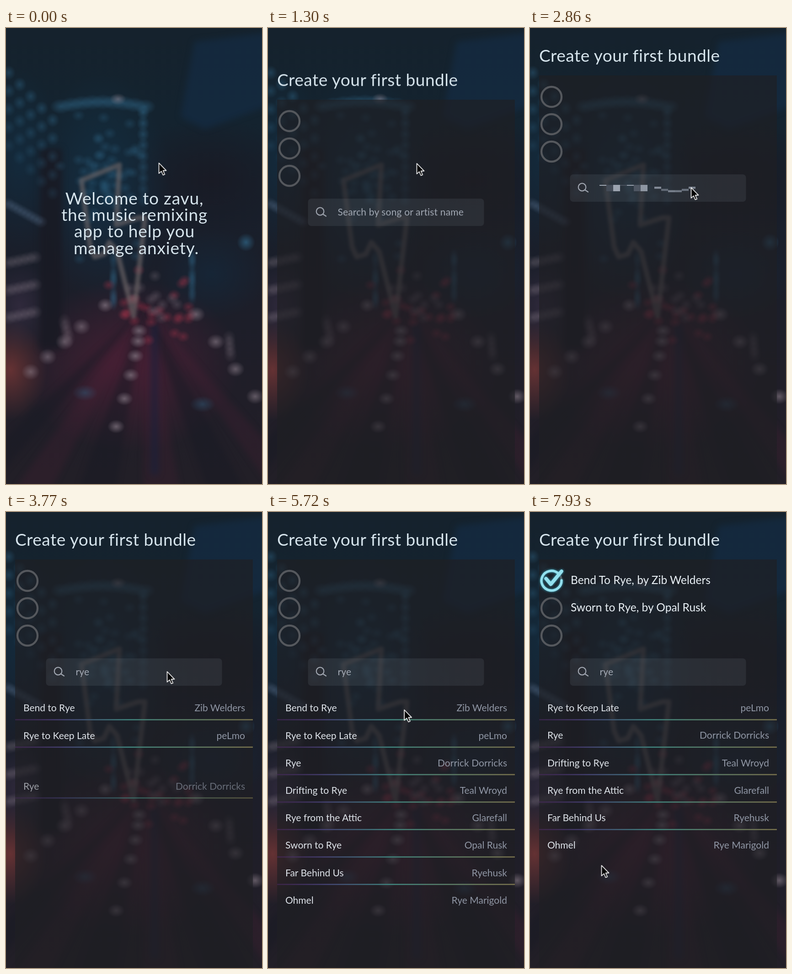
An HTML page with a canvas that plays this animation: 560x1000 px, repeating every 8000 ms.

```html
<!DOCTYPE html>
<html lang="en">
<head>
<meta charset="utf-8">
<title>Create your first bundle</title>
<style>
html, body { margin: 0; width: 100%; height: 100%; overflow: hidden; background: #1b1f28; }
canvas, svg { position: absolute; left: 0; top: 0; width: 560px; height: 1000px; }
text { font-family: Lato, "Open Sans", sans-serif; white-space: pre; }
.big { font-size: 37px; letter-spacing: .5px; fill: #d6e4ec; }
.mid { text-anchor: middle; letter-spacing: .85px; }
.query { font-size: 21px; letter-spacing: .15px; fill: #a4abb6; }
.song { font-size: 21px; fill: #dfe4ea; }
.artist { font-size: 21px; fill: #9097a5; text-anchor: end; }
.item { font-size: 24.5px; fill: #e9f0f5; }
.ring { fill: none; stroke: #55585d; stroke-width: 4.4; }

#welcome, #app, #cursor, #hint, #smear, .item, #check, .key {
  animation: 8s linear infinite paused;
}
#welcome { animation-name: leave; }
#app { animation-name: enter, rise; }
#cursor { animation-name: point; animation-timing-function: ease-in-out; }
#hint { animation-name: hint; animation-timing-function: step-end; }
#smear { animation-name: smear; animation-timing-function: step-end; }
.key { animation-timing-function: step-end; }
.key:nth-child(1) { animation-name: key1; }
.key:nth-child(2) { animation-name: key2; }
.key:nth-child(3) { animation-name: key3; }
#item1 { animation-name: add1; }
#item2 { animation-name: add2; }
#check { animation-name: check; }

@keyframes leave { 0%, .5% { opacity: 1 } 4.875%, 100% { opacity: 0 } }
@keyframes enter { 0%, 3.25% { opacity: 0 } 9.75%, 100% { opacity: 1 } }
@keyframes rise {
  0%, 12.1875% { transform: translateY(389px); animation-timing-function: cubic-bezier(.65, 0, .35, 1) }
  18.1875%, 100% { transform: translateY(0) }
}
@keyframes point {
  0%, 13% { transform: translate(334.5px, 296px) }
  16.25% { transform: translate(325.5px, 297px) }
  22.75%, 60.125% { transform: translate(352.5px, 350px) }
  68.25%, 69.875% { transform: translate(300px, 432px) }
  74.75%, 76.375% { transform: translate(292px, 440px) }
  82.875%, 87.75% { transform: translate(280px, 695px) }
  97.5%, 100% { transform: translate(156.5px, 775px) }
}
@keyframes hint { 0% { opacity: 1 } 35.7%, 100% { opacity: 0 } }
@keyframes smear { 0% { opacity: 0 } 35.7% { opacity: 1 } 37.3%, 100% { opacity: 0 } }
@keyframes key1 { 0% { fill-opacity: 0 } 37.3%, 100% { fill-opacity: 1 } }
@keyframes key2 { 0% { fill-opacity: 0 } 38.9%, 100% { fill-opacity: 1 } }
@keyframes key3 { 0% { fill-opacity: 0 } 40.6%, 100% { fill-opacity: 1 } }
@keyframes add1 { 0%, 77% { opacity: 0 } 81.25%, 100% { opacity: 1 } }
@keyframes add2 { 0%, 87.75% { opacity: 0 } 91%, 100% { opacity: 1 } }
@keyframes check { 0%, 91% { opacity: 0 } 95.875%, 100% { opacity: 1 } }
</style>
</head>
<body>
<canvas id="city" width="560" height="1000"></canvas>
<svg viewBox="0 0 560 1000">
  <defs>
    <linearGradient id="rule" gradientUnits="userSpaceOnUse" x1="20" y1="0" x2="540" y2="0">
      <stop offset="0" stop-color="#4d2a63" stop-opacity=".55"/>
      <stop offset=".2" stop-color="#43406f"/>
      <stop offset=".48" stop-color="#3f837c"/>
      <stop offset="1" stop-color="#77704c"/>
    </linearGradient>
    <filter id="glow" x="-40%" y="-40%" width="180%" height="180%"><feGaussianBlur stdDeviation="2.6"/></filter>
    <g id="tick" fill="none" stroke-linecap="round" stroke-linejoin="round">
      <path d="M61 134A22 21.500 0 1 0 69 150" stroke-width="5.400"/>
      <path d="M35 146L45.500 158.500L69 130" stroke-width="7.500"/>
    </g>
  </defs>

  <g id="welcome" class="big">
    <text class="mid" x="281" y="387">Welcome to zavu,</text>
    <text class="mid" x="281" y="423">the music remixing</text>
    <text class="mid" x="281" y="459">app to help you</text>
    <text class="mid" x="285" y="495.500">manage anxiety.</text>
  </g>

  <g id="app">
    <text class="big" x="20" y="74">Create your first bundle</text>
    <rect x="20" y="104" width="520" height="1300" fill="#1f2024" fill-opacity=".68"/>
    <circle class="ring" cx="47" cy="151" r="22"/>
    <circle class="ring" cx="47" cy="211" r="22"/>
    <circle class="ring" cx="47" cy="271" r="22"/>
    <g id="check">
      <use href="#tick" stroke="#3aa9c2" filter="url(#glow)"/>
      <use href="#tick" stroke="#93e0ee"/>
    </g>
    <text class="item" id="item1" x="89" y="158">Bend To Rye, by Zib Welders</text>
    <text class="item" id="item2" x="89" y="218">Sworn to Rye, by Opal Rusk</text>

    <rect x="87.500" y="321" width="385" height="60" rx="7" fill="#8a9aa3" fill-opacity=".13"/>
    <g fill="none" stroke="#a0a6b0" stroke-width="2.200" stroke-linecap="round">
      <circle cx="114" cy="349" r="8.300"/>
      <path d="M120 355L127 359.500"/>
    </g>
    <text class="query" id="hint" x="152.500" y="358">Search by song or artist name</text>
    <g id="smear"></g>
    <text class="query" x="152.500" y="358"><tspan class="key">r</tspan><tspan class="key">y</tspan><tspan class="key">e</tspan></text>
    <g id="list"></g>
  </g>

  <path id="cursor" d="M0 0V23L5.300 18L9 26.500L12.700 25L9.200 16.600H16Z" fill="#000" stroke="#fff" stroke-width="1.600" stroke-linejoin="round"/>
</svg>
<script>
const LOOP = 8000, TICK = 130, PITCH = 60.2;
const $ = id => document.getElementById(id);

function add(parent, tag, attrs, text = '') {
  const el = document.createElementNS('http://www.w3.org/2000/svg', tag);
  for (const k in attrs) el.setAttribute(k, attrs[k]);
  el.textContent = text;
  return parent.appendChild(el);
}

// Blurred city at night
const ctx = $('city').getContext('2d');
const BLUE = '48,104,138', WHITE = '150,136,148', RED = '160,50,72', WINE = '84,32,56', DARK = '25,26,36';

let seed = 7;
const rand = () => (seed = seed * 16807 % 2147483647) / 2147483647;
const near = (c, spread) => c + (rand() + rand() - 1) * spread;
const times = (n, fn) => { for (let i = 0; i < n; i++) fn(i); };

function blob(x, y, rx, ry, rgb, alpha) {
  ctx.save();
  ctx.translate(x, y);
  ctx.scale(rx, ry);
  const g = ctx.createRadialGradient(0, 0, 0, 0, 0, 1);
  g.addColorStop(0, `rgba(${rgb},${alpha})`);
  g.addColorStop(.5, `rgba(${rgb},${alpha * .5})`);
  g.addColorStop(1, `rgba(${rgb},0)`);
  ctx.fillStyle = g;
  ctx.fillRect(-1, -1, 2, 2);
  ctx.restore();
}

function trace(...points) {
  ctx.beginPath();
  for (const [x, y] of points) ctx.lineTo(x, y);
  ctx.closePath();
}

function paintCity() {
  const sky = ctx.createLinearGradient(0, 0, 0, 1000);
  ['#15222d', '#14232f', '#181f2b', '#1c1e29', '#201e28', '#221f27']
    .forEach((c, i) => sky.addColorStop(i / 5, c));
  ctx.fillStyle = sky;
  ctx.fillRect(0, 0, 560, 1000);

  // glow of the sky, the street and the towers
  blob(450, 330, 190, 130, DARK, .9);
  blob(210, 350, 150, 250, '18,54,78', .65);
  blob(30, 290, 90, 200, '18,48,70', .6);
  blob(450, 540, 120, 100, '19,42,62', .6);
  blob(270, 740, 240, 190, WINE, .75);
  blob(10, 750, 80, 110, '130,58,56', .7);
  blob(30, 610, 70, 100, '66,52,78', .5);

  ctx.filter = 'blur(7px)';
  ctx.fillStyle = 'rgba(20,45,72,.6)';
  trace([412, 30], [575, 10], [575, 170], [435, 222], [382, 195]);
  ctx.fill();
  ctx.fillStyle = `rgba(${DARK},.85)`;
  ctx.fillRect(74, 265, 48, 440);
  // lanes fan out from the vanishing point
  times(6, i => {
    const x = -120 + i * 140;
    ctx.fillStyle = `rgba(${i % 2 ? WINE : DARK},${i % 2 ? .22 : .5})`;
    trace([305, 610], [x, 1010], [x + 80, 1010]);
    ctx.fill();
  });
  ctx.fillStyle = 'rgba(24,34,62,.6)';
  ctx.fillRect(317, 650, 16, 330);
  ctx.filter = 'none';

  // windows
  times(5, row => times(5, i =>
    blob(6 + i * 24, 98 + i * 26 + row * 40, 15, 16, BLUE, .4 - row * .05)));
  times(9, i => {
    blob(120 + i * 23, 172 - Math.sin(i / 2.5) * 10, 24, 17, BLUE, .5);
    blob(300, 185 + i * 24, 14, 17, BLUE, .5 - i * .03);
    blob(4 + i * 9, 385 + i * 5, 16, 14, '92,116,146', .28);
  });
  times(50, () => blob(near(210, 100), near(330, 180), 15, 13, BLUE, .28));
  times(24, i => blob(i % 2 ? 407 : 235, near(555, 60), 11, 20, BLUE, .2));
  times(3, row => times(5, i =>
    blob(6 + i * 14, 515 + row * 60 - i * 3, 18, 16, WHITE, .26)));

  // traffic
  times(26, () => blob(near(320, 110), near(610, 80), 15, 13, RED, .42));
  times(12, () => blob(near(325, 60), near(590, 70), 15, 14, WHITE, .25));
  times(6, i => blob(291 - 2 * i * i, 664 + 18 * i + 4.8 * i * i, 19, 15, WHITE, .6));
  times(4, i => {
    blob(416 + 43 * i, 628 + 60 * i, 20, 17, WHITE, .55);
    blob(165 - 37 * i, 655 + 33 * i, 20, 18, WHITE, .5);
    blob(128 + 3 * i, 645 + 12 * i, 15, 20, WHITE, .2);
    blob(488 + i, 680 + 12 * i, 15, 18, WHITE, .2);
  });
  blob(217, 608, 18, 16, WHITE, .6);
  blob(245, 156, 18, 13, WHITE, .5);
  blob(525, 470, 20, 20, BLUE, .7);
  blob(173, 800, 28, 18, BLUE, .4);
  blob(430, 825, 28, 18, BLUE, .4);

  // neon bolt
  ctx.filter = 'blur(3px)';
  ctx.strokeStyle = 'rgba(112,104,106,.62)';
  ctx.lineWidth = 11;
  ctx.lineJoin = 'round';
  trace([248, 300], [165, 334], [184, 480], [194, 502], [214, 496], [226, 470], [243, 490],
    [279, 632], [304, 416], [290, 416], [241, 432]);
  ctx.stroke();
  ctx.filter = 'none';
}

// The placeholder breaks up into bars
times(14, i => {
  if (i === 7) return;
  const late = i > 7, tall = !late && i % 4 % 3;
  const y = late ? 348 + 8 * Math.sin((i - 8) / 5 * Math.PI) : 344;
  const v = Math.round(120 + 45 * Math.cos(i * 3));
  add($('smear'), 'rect', {
    x: 152 + i * 15, y, width: 15, height: late ? 4.5 : tall ? 14 : 2, fill: `rgb(${v - 8},${v},${v + 12})`
  });
});

// Search results
const songs = [
  ['Bend to Rye', 'Zib Welders'],
  ['Rye to Keep Late', 'peLmo'],
  ['Rye', 'Dorrick Dorricks'],
  ['Drifting to Rye', 'Teal Wroyd'],
  ['Rye from the Attic', 'Glarefall'],
  ['Sworn to Rye', 'Opal Rusk'],
  ['Far Behind Us', 'Ryehusk'],
  ['Ohmel', 'Rye Marigold']
];
const picks = [
  { row: 0, click: 6110, from: 6240, to: 6800 },
  { row: 5, click: 6890, from: 7020, to: 7600 }
];

songs.forEach(([song, artist], i) => {
  const row = add($('list'), 'g', {}), y = 400 + i * PITCH;
  add(row, 'text', { class: 'song', x: 38, y: y + 37.3 }, song);
  add(row, 'text', { class: 'artist', x: 523, y: y + 37.3 }, artist);
  if (i < songs.length - 1)
    add(row, 'rect', { x: 20, y: y + 54.2, width: 520, height: 2.6, fill: 'url(#rule)' });

  const keys = [];
  let dy = 150, opacity = 0;
  const key = (ms, easing = 'linear') =>
    keys.push({ offset: ms / LOOP, transform: `translateY(${dy}px)`, opacity, easing });
  const change = (from, to, easing, newDy, newOpacity) => {
    key(from, easing);
    dy = newDy;
    opacity = newOpacity;
    key(to);
  };
  const start = 3230 + i * 220;
  key(0);
  change(start, start + 210, 'ease-out', 0, 1);
  for (const p of picks) {
    if (i === p.row) change(p.click, p.click + TICK, 'linear', dy, 0);
    if (i > p.row) change(p.from, p.to, 'ease-in-out', dy - PITCH, 1);
  }
  key(LOOP);
  row.animate(keys, { duration: LOOP, iterations: Infinity }).pause();
});

paintCity();

// The screen refreshes in steps of one tick
const anims = document.getAnimations();
const begin = performance.now();
function draw() {
  const t = Math.max(0, performance.now() - begin) % LOOP;
  const step = Math.floor(t / TICK) * TICK;
  for (const a of anims) a.currentTime = step;
  requestAnimationFrame(draw);
}
draw();
</script>
</body>
</html>
```
